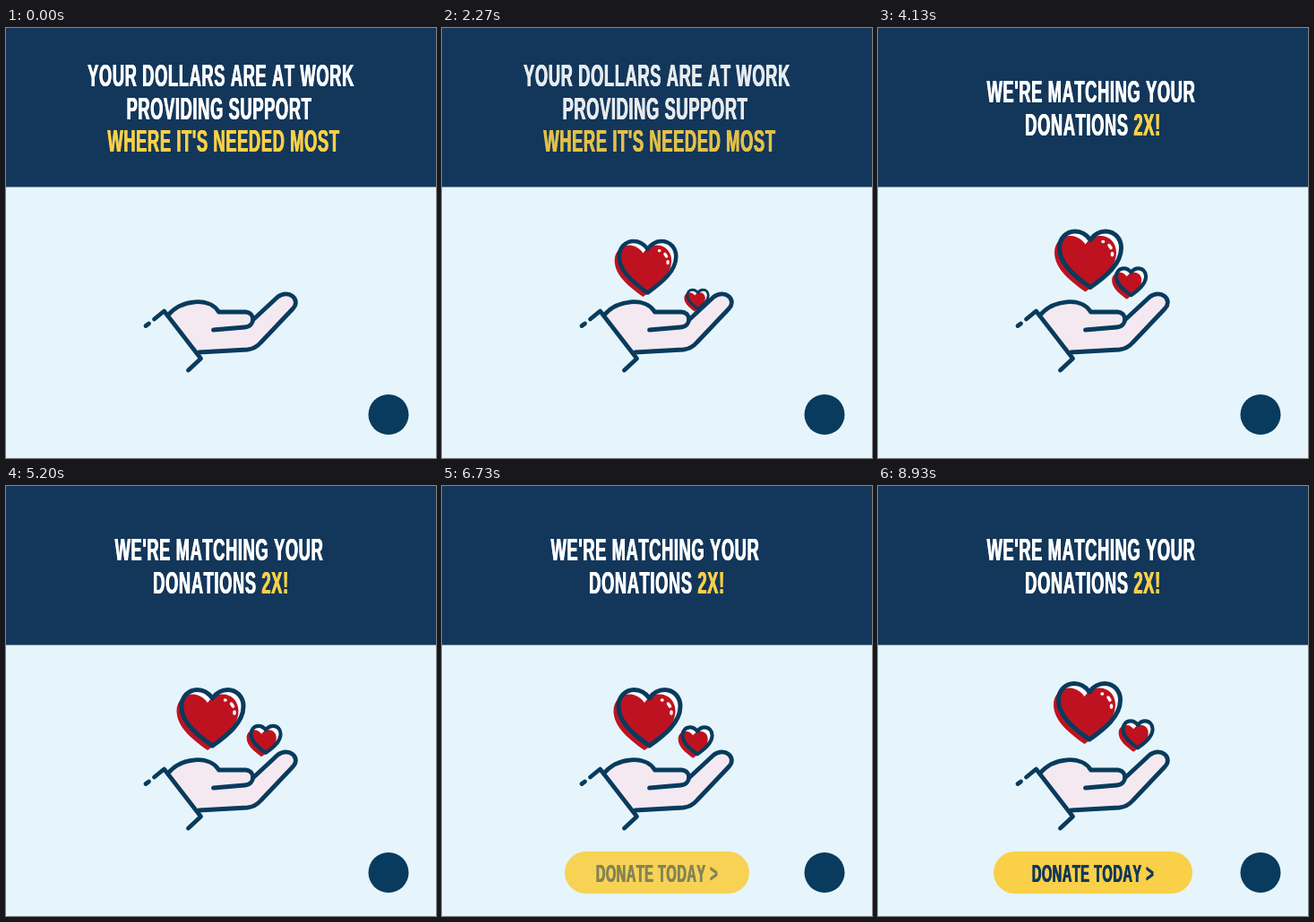
An HTML page for the animation above (8.99 s loop, 480 by 480 pixels).

```html
<!DOCTYPE html>
<html lang="en">
<head>
<meta charset="utf-8">
<title>Donation match</title>
<style>
  :root { --navy: #13375b; --ink: #083b5d; --yellow: #f9d047; }
  html, body { margin: 0; width: 100%; height: 100%; overflow: hidden; background: #e6f5fc; }
  #stage { position: relative; width: 480px; height: 480px; overflow: hidden; }
  svg { position: absolute; inset: 0; }
  /* Condensed bold capitals, thickened sideways */
  .line {
    position: absolute;
    font: bold 34.5px/1 "Liberation Sans", Arial, sans-serif;
    font-kerning: none;
    letter-spacing: .035em;
    white-space: nowrap;
    color: #fff;
    text-shadow: .7px 0, -.7px 0;
    transform: translate(-50%, -50%) scaleX(.53);
  }
  .accent { color: var(--yellow); }
  #label { font-size: 27.5px; color: var(--navy); }
  .ink { fill: none; stroke: var(--ink); stroke-linecap: round; stroke-linejoin: round; }
</style>
</head>
<body>
<div id="stage">
  <svg width="480" height="480" viewBox="0 0 480 480">
    <defs>
      <path id="heart" d="M0-22C-5-29-11-31.5-17-31.5C-27-31.5-34.5-23.5-34.5-13C-34.5 5-17 19 0 31C17 19 34.5 5 34.5-13C34.5-23.5 27-31.5 17-31.5C11-31.5 5-29 0-22Z"/>
    </defs>
    <rect width="480" height="177.500" fill="var(--navy)"/>

    <g id="big">
      <use href="#heart" fill="#fff"/>
      <use href="#heart" x="-5.500" y="5" fill="#bf1220"/>
      <use href="#heart" class="ink" stroke-width="5"/>
      <path d="M14-20h.5M21-16l2 3M24.500-7v2" fill="none" stroke="#fff" stroke-width="3.500" stroke-linecap="round"/>
    </g>
    <g id="small">
      <use href="#heart" fill="#fff"/>
      <use href="#heart" x="-10" y="9" fill="#bf1220"/>
      <use href="#heart" class="ink" stroke-width="8.500"/>
    </g>

    <g transform="translate(-.5 1)">
      <path fill="#f5e9f1" d="M181 320C196 302 228 299 238 316H268Q276 317 276 325L304 299C316 290 330 302 321 312L285 350Q279 357 270 358L216 361Z"/>
      <g class="ink" stroke-width="4.800">
        <path d="M181 320C196 302 228 299 238 316H268C279 317 279 332 267 333L232 336"/>
        <path d="M276 325L304 299C316 290 330 302 321 312L285 350Q279 357 270 358L216 361"/>
        <path d="M156.500 331.500L160 329M166 324L177 315L218 368L204 381"/>
      </g>
    </g>

    <circle cx="427" cy="431.500" r="22.500" fill="var(--ink)"/>
    <rect id="button" y="408" height="47" rx="23.500" fill="var(--yellow)"/>
  </svg>

  <div id="intro">
    <div class="line" style="left:240px;top:53px">YOUR DOLLARS ARE AT WORK</div>
    <div class="line" style="left:237.500px;top:89.500px">PROVIDING SUPPORT</div>
    <div class="line accent" style="left:242.500px;top:126px">WHERE IT'S NEEDED MOST</div>
  </div>
  <div id="offer">
    <div class="line" style="left:237.500px;top:71px">WE'RE MATCHING YOUR</div>
    <div class="line" style="left:240px;top:107.500px">DONATIONS <span class="accent">2X!</span></div>
  </div>
  <div id="label" class="line" style="left:240px;top:433px">DONATE TODAY &gt;</div>
</div>

<script>
const LOOP = 8990;
const el = id => document.getElementById(id);

// Heart keys: time, x, y, scale
const bigKeys = [
  [1150, 229, 311, 0], [1870, 229, 276, .74], [2270, 229.5, 267, .92],
  [3070, 233, 257.5, 1], [4130, 237, 258.5, 1], [5200, 230.5, 259, 1],
  [6730, 231.5, 259, 1], [8930, 236, 252, 1]
];
const smallKeys = [
  [1500, 283, 319, 0], [2270, 285.5, 303, .34], [3070, 287.5, 292, .44],
  [4130, 282.5, 283.5, .48], [5200, 290, 283, .48], [6730, 285, 284.5, .48],
  [8930, 290, 277.5, .48]
];

const progress = (t, from, to) => Math.min(1, Math.max(0, (t - from) / (to - from)));
const smooth = p => p * p * (3 - 2 * p);
const easeOut = p => 1 - (1 - p) ** 3;

// Smooth curve through the keys (cubic Hermite)
function sample(keys, t, column) {
  const last = keys.length - 1;
  if (t >= keys[last][0]) return keys[last][column];
  const i = keys.findIndex(key => key[0] > t) - 1;
  const slope = k => {
    const a = keys[Math.max(0, k - 1)], b = keys[Math.min(last, k + 1)];
    return (b[column] - a[column]) / (b[0] - a[0]);
  };
  const span = keys[i + 1][0] - keys[i][0];
  const p = (t - keys[i][0]) / span, q = 1 - p;
  const s = smooth(p);
  return keys[i][column] * (1 - s) + keys[i + 1][column] * s
    + span * p * q * (q * slope(i) - p * slope(i + 1));
}

function placeHeart(id, keys, t) {
  const visible = t > keys[0][0];
  el(id).style.display = visible ? "" : "none";
  if (!visible) return;
  const [x, y, scale] = [1, 2, 3].map(column => sample(keys, t, column));
  el(id).setAttribute("transform", `translate(${x} ${y}) scale(${scale})`);
}

function draw() {
  const t = performance.now() % LOOP;
  placeHeart("big", bigKeys, t);
  placeHeart("small", smallKeys, t);

  el("intro").style.opacity = 1 - smooth(progress(t, 2120, 2900));
  el("offer").style.opacity = smooth(progress(t, 2880, 3840));

  const open = easeOut(progress(t, 6170, 7130));
  const button = el("button");
  button.setAttribute("x", 240 - 111 * open);
  button.setAttribute("width", 222 * open);
  button.style.opacity = open;
  el("label").style.opacity = smooth(progress(t, 6380, 7080));

  requestAnimationFrame(draw);
}
draw();
</script>
</body>
</html>
```
